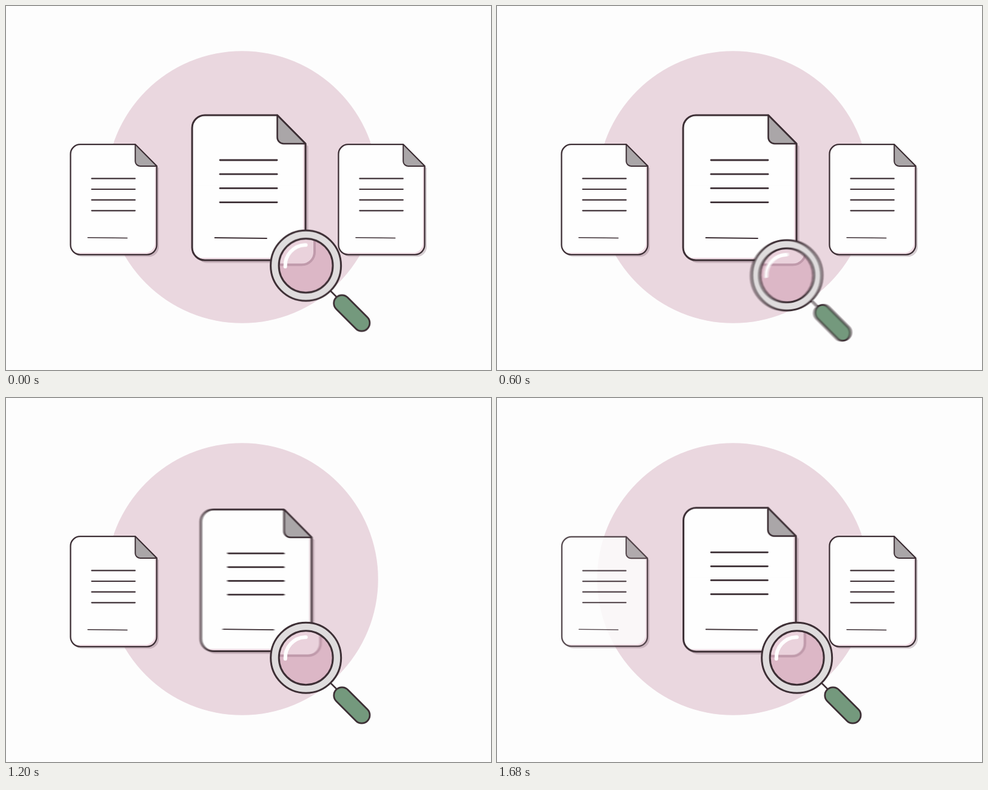
An HTML page with a canvas that plays this animation: 800 by 600 pixels, repeating every 1.71 s.

```html
<!DOCTYPE html>
<html lang="en">
<head>
<meta charset="utf-8">
<title>Document check</title>
<style>
html, body { margin: 0; width: 100%; height: 100%; overflow: hidden; background: #fdfdfd; }
canvas { display: block; width: 800px; height: 600px; }
</style>
</head>
<body>
<canvas id="stage" width="800" height="600"></canvas>
<script>
const W = 800, H = 600, LOOP = 1710, STEP = 30;
const SHUTTER = 14, SAMPLES = 9;
const INK = '#3d2f35', PINK = '#ead7df', PAPER = '#fefefe';
const LEFT = { x: 177.5, y: 319, s: 0.76 };
const MID = { x: 400.5, y: 299.5, s: 1 };
const RIGHT = { x: 619.5, y: 319, s: 0.76 };

// Lens centre every 60 ms, swinging over the signature line and back
const PATH = [
  [494.7, 428.2], [488, 413], [464, 384], [431, 365], [395, 360], [373, 368], [367, 390],
  [381, 418], [410, 438], [446, 445], [478, 444], [491, 436], [494.7, 430], [494.7, 428.2]
];

const stage = document.getElementById('stage').getContext('2d');
const makeLayer = () => {
  const c = document.createElement('canvas');
  c.width = W;
  c.height = H;
  return c.getContext('2d');
};
const scene = makeLayer(), sheet = makeLayer();

const clamp = v => Math.max(0, Math.min(1, v));
const lerp = (a, b, p) => a + (b - a) * p;
const span = (t, start, length) => clamp((t - start) / length);
const sine = u => (1 - Math.cos(Math.PI * u)) / 2;
const between = (a, b, move, size) => ({ x: lerp(a.x, b.x, move), y: lerp(a.y, b.y, move), s: lerp(a.s, b.s, size) });

function spline(a, b, c, d, u) {
  return b + u / 2 * (c - a + u * (2 * a - 5 * b + 4 * c - d + u * (3 * (b - c) + d - a)));
}

function lensAt(t) {
  const last = PATH.length - 1;
  const k = Math.min(t / 60, last);
  const i = Math.min(Math.floor(k), last - 1);
  const at = n => PATH[Math.max(0, Math.min(last, n))];
  return [0, 1].map(j => spline(at(i - 1)[j], at(i)[j], at(i + 1)[j], at(i + 2)[j], k - i));
}

// Page outline around its own centre at full size
function pagePath(g) {
  g.beginPath();
  g.moveTo(-72, -119.5);
  g.lineTo(47, -119.5);
  g.lineTo(93.5, -72.5);
  g.lineTo(93.5, 98.5);
  g.arcTo(93.5, 119.5, 72.5, 119.5, 21);
  g.lineTo(-72, 119.5);
  g.arcTo(-93.5, 119.5, -93.5, 98.5, 21);
  g.lineTo(-93.5, -98.5);
  g.arcTo(-93.5, -119.5, -72, -119.5, 21);
  g.closePath();
}

function line(g, x1, y1, x2, y2, width, color = INK) {
  g.beginPath();
  g.moveTo(x1, y1);
  g.lineTo(x2, y2);
  g.lineWidth = width;
  g.strokeStyle = color;
  g.stroke();
}

function place(g, pose, dx = 0, dy = 0) {
  g.translate(pose.x + dx, pose.y + dy);
  g.scale(pose.s, pose.s);
  g.lineCap = g.lineJoin = 'round';
}

function drawPage(g, pose) {
  g.save();
  place(g, pose);

  g.save();
  g.translate(4.5, 4.5);
  pagePath(g);
  g.fillStyle = 'rgba(90, 55, 72, 0.24)';
  g.fill();
  g.restore();

  g.save();
  pagePath(g);
  g.fillStyle = '#f0dde5';
  g.fill();
  g.clip();
  g.translate(-4, -4);
  pagePath(g);
  g.fillStyle = PAPER;
  g.fill();
  g.fillRect(-94, -120, 184, 120);
  g.restore();

  pagePath(g);
  g.lineWidth = 3;
  g.strokeStyle = INK;
  g.stroke();

  g.beginPath();
  g.moveTo(47, -119.5);
  g.lineTo(47, -83);
  g.arcTo(47, -72.5, 58, -72.5, 10.5);
  g.lineTo(93.5, -72.5);
  g.closePath();
  g.fillStyle = '#aaa6a8';
  g.fill();
  g.lineWidth = 2.6;
  g.stroke();

  for (let i = 0; i < 4; i++) {
    const y = -45.5 + i * 23.2;
    line(g, -47.5, y, 46.5, y, 2.8);
  }
  line(g, -56, 82.5, 29.5, 83.5, 1.8);
  g.restore();
}

function fadePage(pose, alpha) {
  if (alpha <= 0) return;
  sheet.clearRect(0, 0, W, H);
  drawPage(sheet, pose);
  scene.globalAlpha = alpha;
  scene.drawImage(sheet.canvas, 0, 0);
  scene.globalAlpha = 1;
}

function disc(g, x, y, r, fill, width) {
  g.beginPath();
  g.arc(x, y, r, 0, Math.PI * 2);
  g.fillStyle = fill;
  g.fill();
  if (width) {
    g.lineWidth = width;
    g.strokeStyle = INK;
    g.stroke();
  }
}

// The tinted page seen through the glass sits a little down and right
function tintedPage(g, pose) {
  g.save();
  place(g, pose, 15 * pose.s, 7.5 * pose.s);
  pagePath(g);
  g.fillStyle = '#ead2dc';
  g.fill();
  g.lineWidth = 4;
  g.strokeStyle = '#c09aab';
  g.stroke();
  g.restore();

  g.save();
  place(g, pose, 2, 1);
  line(g, -56, 82.5, 29.5, 83.5, 1.8, '#8f7a86');
  g.restore();
}

function drawLens(g, x, y, pages) {
  g.save();
  g.translate(x, y);
  g.lineCap = 'round';
  line(g, 41, 42, 52, 53, 2.6);
  line(g, 59.5, 62, 92, 94.5, 29.5);
  line(g, 59.5, 62, 92, 94.5, 24, '#74997d');
  disc(g, 0, 0, 58, '#dfdcdd', 3);
  disc(g, 0, 0, 44.5, '#dcb7c6');

  g.save();
  g.beginPath();
  g.arc(0, 0, 44.5, 0, Math.PI * 2);
  g.clip();
  g.translate(-x, -y);
  for (const pose of pages) tintedPage(g, pose);
  g.restore();

  g.beginPath();
  g.arc(0, 0, 44.5, 0, Math.PI * 2);
  g.lineWidth = 3;
  g.strokeStyle = INK;
  g.stroke();

  g.beginPath();
  g.arc(0, 0, 34, Math.PI * 0.985, Math.PI * 1.5);
  g.lineWidth = 6;
  g.strokeStyle = '#fff';
  g.stroke();
  g.restore();
}

function drawScene(t) {
  const g = scene;
  g.fillStyle = '#fdfdfd';
  g.fillRect(0, 0, W, H);
  disc(g, 389.5, 298.5, 224.3, PINK);

  const leave = span(t, 970, 220);
  const enter = span(t, 1486, 224);
  const first = between(LEFT, MID, sine(span(t, 1287, 400)), span(t, 1323, 370));
  const second = between(MID, RIGHT, sine(span(t, 1115, 560)), sine(span(t, 1089, 556)));
  const small = (slot, k) => ({ ...slot, s: slot.s * k });

  fadePage(small(RIGHT, 1 - 0.36 * leave ** 1.3), 1 - leave);
  fadePage(small(LEFT, 1 - 0.36 * (1 - enter) ** 2), enter);
  drawPage(g, first);
  drawPage(g, second);

  const [x, y] = lensAt(t);
  drawLens(g, x, y, [first, second]);
}

// Averages several moments around t for motion blur
function render(t) {
  for (let i = 0; i < SAMPLES; i++) {
    const shift = (i / (SAMPLES - 1) - 0.5) * SHUTTER;
    drawScene(Math.max(0, Math.min(LOOP, t + shift)));
    stage.globalAlpha = 1 / (i + 1);
    stage.drawImage(scene.canvas, 0, 0);
  }
  stage.globalAlpha = 1;
}

let origin = null, shown = -1;
function tick(now) {
  if (origin === null) origin = now;
  const t = Math.floor(((now - origin) % LOOP) / STEP) * STEP;
  if (t !== shown) {
    shown = t;
    render(t);
  }
  requestAnimationFrame(tick);
}
render(0);
requestAnimationFrame(tick);
</script>
</body>
</html>
```
